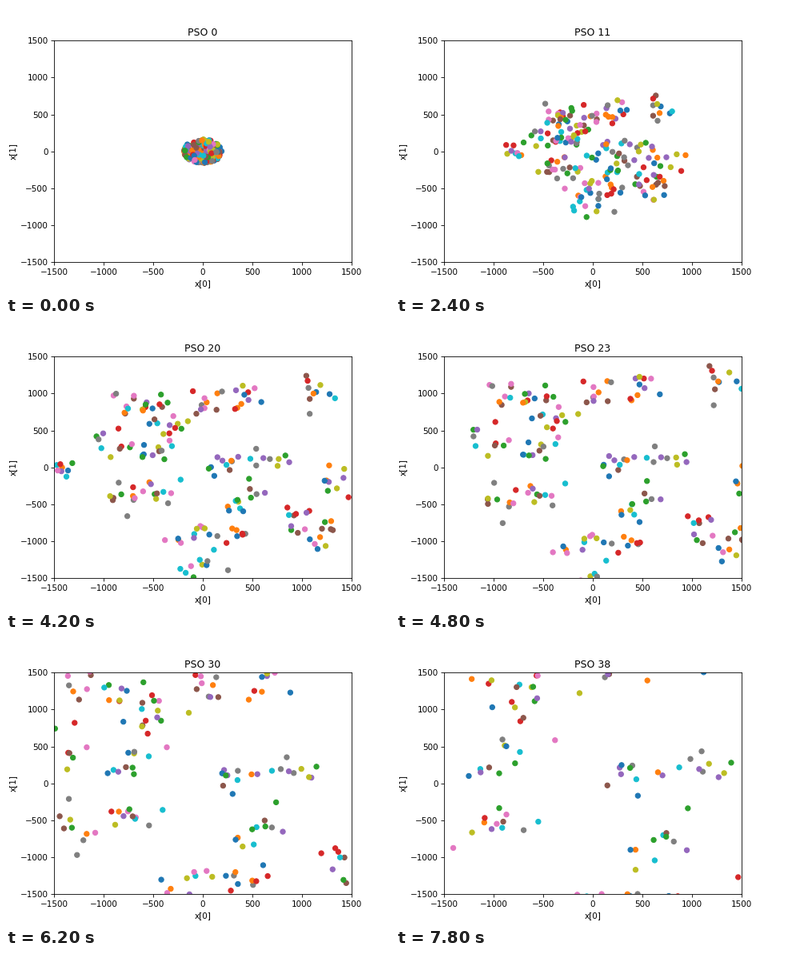
Animation of 480 by 360 pixels, one loop 8000 ms. Source, as a matplotlib script:

```python
import numpy as np
import matplotlib.pyplot as plt
from matplotlib.animation import FuncAnimation

COUNT = 200
STEPS = 40
LIMIT = 1500
SPAN = 30  # iterations a particle needs to reach its goal

# Centres that the groups of the swarm drift to, some beyond the axes
CENTRES = np.array([
    (280, 120), (-430, 800), (-730, 1080), (-740, 280), (-720, -420),
    (-150, -1260), (350, -1250), (1380, -980), (900, 150), (60, 1430),
    (-1230, -600), (500, -650), (-1350, 500), (-1150, 1380), (620, 1350),
    (2050, -250), (-2150, 0), (0, -2050), (1750, -1400), (1650, 1500),
])

rng = np.random.default_rng(12)

angle = rng.uniform(0, 2 * np.pi, COUNT)
radius = np.sqrt(rng.random(COUNT))
start = np.column_stack([190 * radius * np.cos(angle),
                         168 * radius * np.sin(angle)])
group = rng.permutation(np.arange(COUNT) % len(CENTRES))
goal = CENTRES[group] + rng.normal(0, (130, 160), (COUNT, 2))
bend = rng.normal(0, 60, (COUNT, 2))


def positions(n):
    s = n / SPAN
    return start + (goal - start) * s + bend * np.sin(np.pi * s)


fig, ax = plt.subplots(figsize=(6.4, 4.8), dpi=75)
colours = [f"C{i % 10}" for i in range(COUNT)]
dots = ax.scatter(*positions(0).T, c=colours)
ax.set(xlim=(-LIMIT, LIMIT), ylim=(-LIMIT, LIMIT), xlabel="x[0]", ylabel="x[1]")
title = ax.set_title("PSO 0")


def update(frame):
    n = max(frame - 1, 0)
    dots.set_offsets(positions(n))
    title.set_text(f"PSO {n}")
    return dots, title


anim = FuncAnimation(fig, update, frames=STEPS, interval=200,
                     repeat=True, repeat_delay=0)
plt.show()
```
